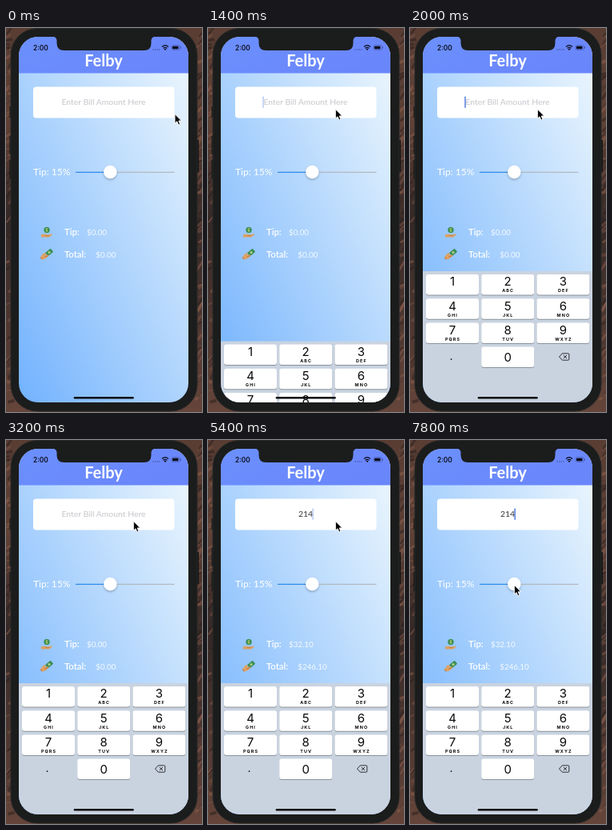
Write an HTML page that moves like this. It is 245 px wide and 480 px high and loops after 8 s.

```html
<!DOCTYPE html>
<html lang="en">
<head>
<meta charset="utf-8">
<title>Tip calculator</title>
<style>
  html, body { margin: 0; width: 100%; height: 100%; overflow: hidden; background: #2c211f; }
  svg { display: block; width: 245px; height: 480px; font-family: Lato, sans-serif; }
  .mid { text-anchor: middle; }
  .key, .status { font-family: Inter, sans-serif; }
</style>
</head>
<body>
<svg viewBox="0 0 245 480">
  <defs>
    <linearGradient id="sky" x1="0" y1="1" x2="1" y2="0">
      <stop offset="0" stop-color="#72b2fe"/>
      <stop offset=".5" stop-color="#b0d5fd"/>
      <stop offset="1" stop-color="#eff8fd"/>
    </linearGradient>
    <linearGradient id="bar" x2="1" y2=".4">
      <stop offset="0" stop-color="#6b90fd"/>
      <stop offset="1" stop-color="#6a86fb"/>
    </linearGradient>
    <linearGradient id="rock" x2="0" y2="1">
      <stop offset="0" stop-color="#593d33"/>
      <stop offset=".25" stop-color="#5f4136"/>
      <stop offset=".5" stop-color="#332725"/>
      <stop offset="1" stop-color="#65453a"/>
    </linearGradient>
    <filter id="soft" x="-50%" y="-50%" width="200%" height="200%">
      <feDropShadow dx="0" dy="1.5" stdDeviation="1.5" flood-opacity=".28"/>
    </filter>
    <clipPath id="screen"><rect x="16" y="11" width="212" height="457" rx="24"/></clipPath>
  </defs>

  <rect width="245" height="480" fill="url(#rock)"/>
  <g id="stones"></g>
  <path d="M5.500 98V112M5.500 135V158M5.500 165V188M240 140V180" stroke="#151515" stroke-width="2"/>
  <rect x="6" y=".5" width="233" height="478.500" rx="33" fill="#1b1c1c" stroke="#292a2a"/>

  <g clip-path="url(#screen)">
    <rect x="16" y="11" width="212" height="457" fill="url(#sky)"/>
    <rect x="16" y="11" width="212" height="45.500" fill="url(#bar)"/>
    <path d="M57 10Q63.500 11 63.500 16V19Q63.500 28 72.500 28H172.500Q181.500 28 181.500 19V16Q181.500 11 188 10Z" fill="#1b1c1c"/>
    <text class="mid" x="122" y="48.300" font-size="20" font-weight="700" fill="#fff">Felby</text>

    <g class="status" fill="#0b0d18">
      <text x="34" y="27.700" font-size="8.300" font-weight="600">2:00</text>
      <path d="M183.500 27H192.500" stroke="#4a60b5" stroke-width="1.400" stroke-dasharray="1.400 1.100"/>
      <path d="M195 23.500Q199 19.900 203 23.500M196.500 25.400Q199 23.200 201.500 25.400" fill="none" stroke="#0b0d18" stroke-width="1.200"/>
      <path d="M197.500 26.400Q199 25.200 200.500 26.400L199 27.900Z"/>
      <rect x="207" y="21.700" width="10.400" height="5.600" rx="1.600" fill="none" stroke="#4358a8" stroke-width=".7"/>
      <rect x="208" y="22.700" width="7.500" height="3.600" rx=".8"/>
      <path d="M218.500 23.500V25.500" stroke="#4358a8"/>
    </g>

    <rect x="34" y="73.500" width="176.500" height="39" rx="4" fill="#fff"/>
    <text id="amount" class="mid" x="122" y="96.400" font-size="10.400"></text>
    <rect id="caret" y="85.500" width="1.400" height="14.500" rx=".7" fill="#4774dc"/>

    <g fill="#fff">
      <text x="34" y="184" font-size="12">Tip: 15%</text>
      <g font-size="11.300" font-weight="600">
        <text x="73" y="258.800">Tip:</text>
        <text x="73" y="286.800">Total:</text>
      </g>
      <g font-size="9.800" opacity=".88">
        <text id="tip" x="101" y="258.500"></text>
        <text id="total" x="112.300" y="286.500"></text>
      </g>
    </g>

    <path d="M130 180.300H210.500" stroke="#b2b8c0" stroke-width="1.300"/>
    <path d="M87 180.300H130" stroke="#2f8be6" stroke-width="1.300"/>
    <circle cx="130.300" cy="180" r="8.200" fill="#fff" filter="url(#soft)"/>

    <g id="tipIcon">
      <circle cx="51" cy="252.400" r="3.700" fill="#3b8f56"/>
      <path d="M52.200 251Q50 250.200 50 251.500T52 253.300Q52 254.500 49.800 254M51 249.900V254.900" fill="none" stroke="#c9d06a" stroke-width=".7"/>
      <path d="M44 258H47Q49 257 51 258.300H54L57 257.300Q58.300 257.800 57.300 259L54 261.500H44Z" fill="#dea062"/>
      <path d="M49 259.500H54" stroke="#b57a45" stroke-width=".7"/>
    </g>
    <g id="totalIcon">
      <g transform="rotate(-40 54 280.500)">
        <rect x="49.500" y="277.800" width="9" height="5.400" rx=".8" fill="#3b8f56"/>
        <circle cx="54" cy="280.500" r="1.500" fill="#b3cf86"/>
      </g>
      <path d="M43 286.500L46 282.500Q48 280.500 50 282L48.800 284L52.500 283.300Q54 284 53 285.300L49 288.500L45 289.500Z" fill="#dea062"/>
      <path d="M48.500 286L52.500 284.500M43 286.500L45 289.500" stroke="#a9683a" stroke-width=".8"/>
    </g>

    <g id="keyboard">
      <rect x="16" y="304" width="212" height="166" fill="#c9d3e0"/>
      <g id="keys"></g>
      <text class="key mid" x="51.500" y="414.500" font-size="14" fill="#111">.</text>
      <path d="M186.500 411L190.300 406.800H197.800Q198.800 406.800 198.800 407.800V414.200Q198.800 415.200 197.800 415.200H190.300ZM191.800 409L196 413M196 409L191.800 413" fill="none" stroke="#222" stroke-width=".9" stroke-linejoin="round"/>
    </g>
    <path d="M86 462.300H158.500" stroke="#080808" stroke-width="2.600" stroke-linecap="round"/>
  </g>

  <path id="cursor" d="M0 0V11.800L2.700 9.300L4.600 13.700L6.700 12.800L4.900 8.500H8.500Z" fill="#050505" stroke="#fff" stroke-width="1" stroke-linejoin="round"/>
</svg>

<script>
const $ = id => document.getElementById(id);
const LOOP = 8000, STEP = 200;

// Rough rock behind the phone
let seed = 7;
const random = () => (seed = seed * 16807 % 2147483647) / 2147483647;
const tones = ['#7d5546', '#281d1c', '#49352f', '#946350'];
let stones = '';
for (let i = 0; i < 140; i++) {
  const x = i % 2 ? 240 + random() * 5 : random() * 8, y = random() * 480;
  stones += `<path d="M${x - 4} ${y}l8 ${-random() * 14}" stroke="${tones[(i >> 1) % 4]}" stroke-width="${1 + random() * 3}" opacity=".5"/>`;
}
$('stones').innerHTML = stones;

const letters = ['', 'ABC', 'DEF', 'GHI', 'JKL', 'MNO', 'PQRS', 'TUV', 'WXYZ'];
function key(digit, col, row, label = '') {
  const x = 20 + col * 69.2, y = 308 + row * 30.2;
  return `<rect x="${x}" y="${y + 1}" width="66" height="25.5" rx="3" fill="#8b929c"/>
    <rect x="${x}" y="${y}" width="66" height="25.5" rx="3" fill="#fff"/>
    <g class="key mid" fill="#080808">
      <text x="${x + 33}" y="${y + (digit ? 14.3 : 18.2)}" font-size="15">${digit}</text>
      <text x="${x + 33.5}" y="${y + 22.3}" font-size="5.4" font-weight="700" letter-spacing="1.1">${label}</text>
    </g>`;
}
$('keys').innerHTML =
  letters.map((label, i) => key(i + 1, i % 3, Math.floor(i / 3), label)).join('') + key(0, 1, 3);

const clamp = v => Math.max(0, Math.min(1, v));
const smooth = v => v * v * (3 - 2 * v);

// Pointer stops: time, x, y
const stops = [[200, 211, 107.500], [1200, 159.300, 101.500], [5800, 159.300, 101.500],
               [6800, 132, 198.500], [7200, 132, 198.500], [7600, 130.300, 181.300]];
function pointerAt(t) {
  let [, x, y] = stops[0];
  for (let i = 1; i < stops.length; i++) {
    const [t0, x0, y0] = stops[i - 1], [t1, x1, y1] = stops[i];
    if (t < t0) break;
    const p = smooth(clamp((t - t0) / (t1 - t0)));
    x = x0 + (x1 - x0) * p;
    y = y0 + (y1 - y0) * p;
  }
  return [x, y];
}

function caretOpacity(t) {
  if (t < 1400) return 0;
  if (t >= 3800 && t < 5000) return 1;
  const phase = t % 1000;
  return phase === 200 ? 0 : phase === 400 ? .4 : 1;
}

const money = value => '$' + value.toFixed(2);

function draw(t) {
  const typed = '214'.slice(0, [3800, 4200, 4600].filter(at => t >= at).length);
  const bill = Number(typed);
  $('amount').textContent = typed || 'Enter Bill Amount Here';
  $('amount').setAttribute('fill', typed ? '#34353a' : '#c5c6cb');
  $('tip').textContent = money(bill * .15);
  $('total').textContent = money(bill * 1.15);

  $('caret').setAttribute('x', typed ? 121.3 + typed.length * 3.05 : 68.300);
  $('caret').setAttribute('opacity', caretOpacity(t));

  const hidden = 164 * (1 - clamp((t - 1300) / 530)) ** 3;
  $('keyboard').setAttribute('transform', `translate(0 ${hidden})`);
  $('keyboard').setAttribute('visibility', t < 1400 ? 'hidden' : 'visible');
  $('cursor').setAttribute('transform', `translate(${pointerAt(t)})`);
}

function tick() {
  draw(Math.floor(performance.now() % LOOP / STEP) * STEP);
  requestAnimationFrame(tick);
}
tick();
</script>
</body>
</html>
```
